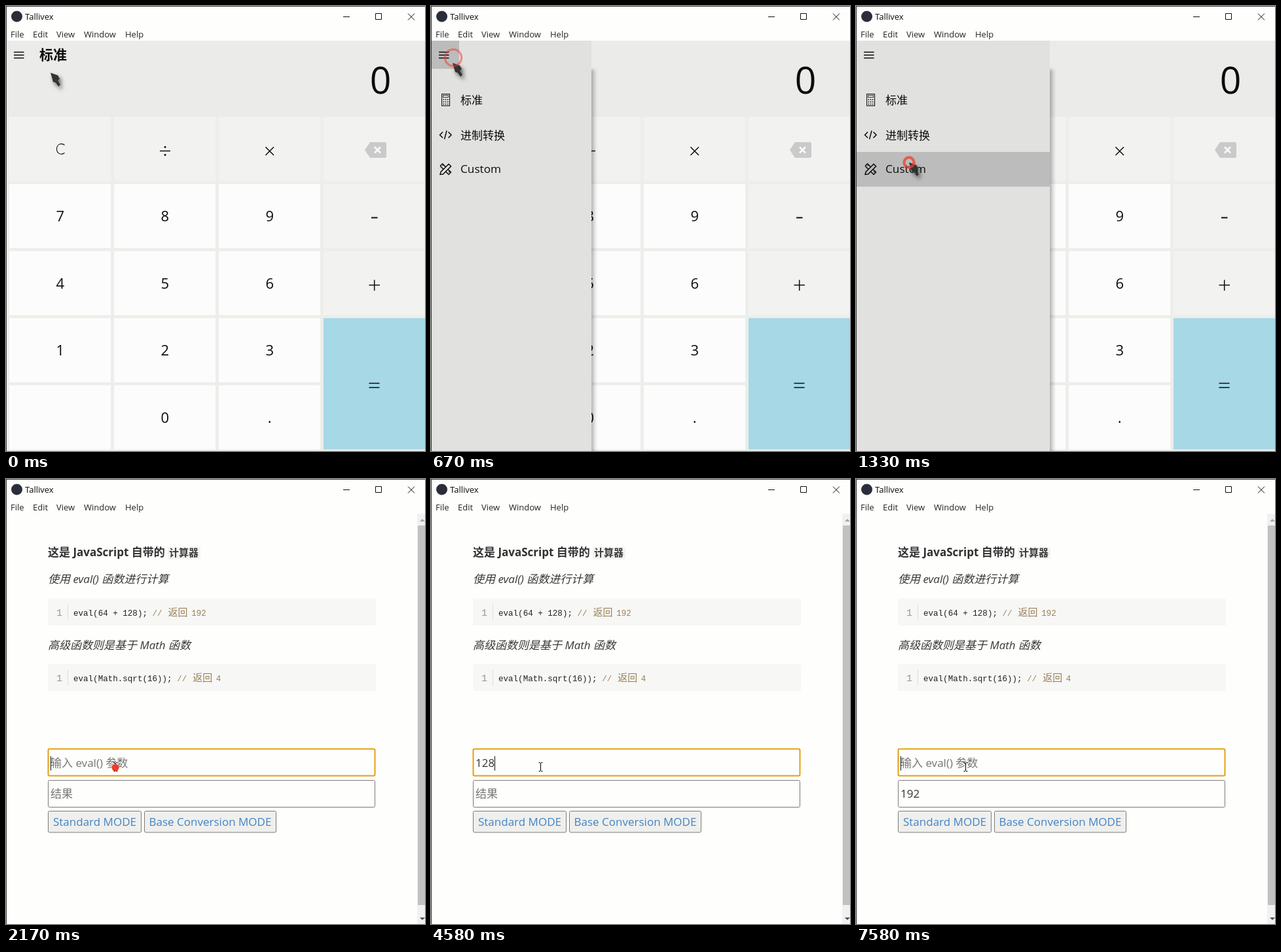
An HTML page that plays this animation: 640x680 px, repeating every 8 s.

```html
<!DOCTYPE html>
<html lang="zh-CN">
<head>
<meta charset="utf-8">
<title>Calculator</title>
<style>
html, body { margin: 0; width: 100%; height: 100%; overflow: hidden; background: #fefefe; }
#stage { display: block; width: 640px; height: 680px; }
text { font-family: "Open Sans", "Noto Sans CJK SC", "Noto Sans CJK", sans-serif; white-space: pre; }
.mono { font-family: "Liberation Mono", "Noto Sans CJK SC", "Noto Sans CJK", monospace; }
.line { fill: none; stroke: #0c0c0c; }
#arrow { filter: drop-shadow(3px 4px 3px rgba(0, 0, 0, .6)); }
#shade { filter: blur(2px); }
</style>
</head>
<body>
<svg id="stage" viewBox="0 0 640 680"></svg>
<script>
const LOOP = 8000, FPS = 12;
const INK = '#0c0c0c', GREY = '#ededea', PALE = '#f2f2f0', PAPER = '#fefefd', HOVER = '#bcbcbc';
const BORDER = '#7a7a7a', HINT = '#757575', BODY = '#333';

const rect = (x, y, w, h, fill, more = '') =>
  `<rect x="${x}" y="${y}" width="${w}" height="${h}" fill="${fill}" ${more}/>`;
const text = (x, y, size, str, more = '') =>
  `<text x="${x}" y="${y}" font-size="${size}" fill="${INK}" ${more}>${str}</text>`;
const line = (d, width = 1.5, more = '') =>
  `<path class="line" d="${d}" stroke-width="${width}" ${more}/>`;
const dot = (x, y, r, fill) => `<circle cx="${x}" cy="${y}" r="${r}" fill="${fill}"/>`;

function titleBar() {
  const menus = [['File', 7], ['Edit', 41], ['View', 77], ['Window', 119], ['Help', 182]];
  return rect(0, 0, 640, 53, PAPER) + dot(16.5, 16, 8.5, '#2b2e3a') +
    text(29, 21, 13, 'Tallivex') +
    menus.map(([name, x]) => text(x, 48, 13, name, 'fill-opacity=".9"')).join('') +
    line('M515 16.5h10M564.5 11.5h9v9h-9zM614 11.5l10 10M624 11.5l-10 10', 1) +
    rect(0, 0, 640, 1, '#3c3c3c') + rect(0, 0, 1, 680, '#3c3c3c');
}

function calculator() {
  const colX = c => 5 + 160 * c, rowY = r => 169.5 + 102.5 * r;
  let out = rect(0, 53, 640, 627, GREY) + rect(1, 53, 639, 116, '#ebebe9');
  for (let r = 0; r < 5; r++)
    for (let c = 0; c < 4; c++) {
      if (c === 3 && r > 2) continue;
      out += rect(colX(c), rowY(r), 155, 98, r && c < 3 ? '#fcfcfc' : PALE);
    }
  out += rect(485, 477, 155, 200.5, '#a6d8e6');
  ['789', '456', '123', ' 0.'].forEach((row, r) => [...row].forEach((key, c) => {
    out += text(colX(c) + 77.7, 329 + 102.6 * r, 22, key, 'text-anchor="middle"');
  }));
  out += line('M89.5 212.5C84 208.5 77.5 211.5 77.5 218.5S84 228.5 89.5 224.5', 1.1);
  out += line('M235 221.5h16') + dot(243, 215.5, 1.5, INK) + dot(243, 227.5, 1.5, INK);
  out += line('M396.5 215.5l12.5 12.5M409 215.5l-12.5 12.5');
  out += line('M558 323.5h9.5', 2) + line('M554.5 426.5h16.5M562.7 418.5v16.5');
  out += line('M554.5 576.5h16M554.5 583h16');
  out += '<path d="M548 220l8-12h23q2 0 2 2v20q0 2-2 2h-23z" fill="#cacaca"/>' +
    '<path d="M563 215.5l9 9M572 215.5l-9 9" stroke="#fafafa" stroke-width="2.5"/>';
  return out + text(51, 82, 21, '标准', 'font-weight="700"') +
    text(572, 133.5, 57, '0', 'text-anchor="middle"');
}

function menuItems() {
  const calc = rect(16.5, 134.5, 12, 18, 'none', `stroke="${INK}"`) +
    rect(18.5, 136.5, 8, 3, 'none', `stroke="${INK}" stroke-width=".8"`) +
    line('M18.5 143h8M18.5 146.5h8M18.5 150h8', 1.6, 'stroke-dasharray="1.6 1.6"');
  const code = line('M18 192.5l-4.5 4.5l4.5 4.5M26.5 192.5l4.5 4.5l-4.5 4.5M24 190.5l-3.5 13');
  const tools = line('M14 257.5l1-4L27 241.5l3.5 3.5L18.5 257zM14 244.5l3.5-3.5l5 5M22 252.5l5 5l3.5-3.5l-5-5M14 244.5l5 5M17.5 244l1.5-1.5M27 254l1.5-1.5');
  return calc + code + tools + text(45, 150, 17, '标准') +
    text(45, 203.5, 17, '进制转换') + text(45, 255, 17.2, 'Custom');
}

function codeBlock(y, code, result) {
  const at = n => 103 + 7.53 * n, n = code.length + 1, note = '#99805a';
  const mono = (x, size, str, fill) =>
    `<text class="mono" x="${x}" y="${y + 26}" font-size="${size}" fill="${fill}">${str}</text>`;
  return rect(64, y, 501, 41.5, '#f7f7f5', 'rx="2"') + rect(94, y + 9, 1, 24, '#dededc') +
    mono(77, 15, '1', '#999') + mono(at(0), 12.55, code, '#222') +
    mono(at(n), 12.55, '//', note) + mono(at(n + 3) + 1.5, 15, '返回', note) +
    mono(at(n + 8) - .5, 12.55, result, note);
}

function button(x, w, label) {
  return rect(x + .5, 507.5, w - 1, 32.5, '#efefed', `rx="2" stroke="${BORDER}"`) +
    text(x + w / 2, 530, 17, label, 'style="fill:#4183c4" text-anchor="middle"');
}

function customPage() {
  const italic = (y, str) => text(64, y, 17, str, 'font-style="italic" fill-opacity=".82"');
  return rect(0, 53, 640, 627, PAPER) +
    rect(628, 53, 12, 627, '#f1f1f1') + rect(629, 71, 11, 580, '#c1c1c1') +
    '<path d="M632 65l4-4l4 4z" fill="#a3a3a3"/><path d="M632 670l4 4l4-4z" fill="#505050"/>' +
    text(64, 118, 17, '这是 JavaScript 自带的', 'font-weight="700" fill-opacity=".85"') +
    rect(247, 104, 50, 18.5, '#f3f3f0', 'rx="2"') +
    text(249, 118, 15, '计算器', 'class="mono" font-weight="700" fill-opacity=".8"') +
    italic(159, '使用 eval() 函数进行计算') + codeBlock(182.5, 'eval(64 + 128);', '192') +
    italic(260, '高级函数则是基于 Math 函数') + codeBlock(282.5, 'eval(Math.sqrt(16));', '4') +
    rect(64.5, 412.5, 499, 41, PAPER, 'id="field" rx="2"') +
    rect(64.5, 460.5, 499, 41, PAPER, `rx="2" stroke="${BORDER}"`) +
    text(68, 440, 17, '', 'id="entry"') + text(68, 487, 17, '', 'id="answer"') +
    rect(0, 423.5, 1, 22, INK, 'id="caret"') +
    button(64, 143, 'Standard MODE') + button(211, 202, 'Base Conversion MODE');
}

const stage = document.getElementById('stage');
stage.innerHTML = `
<defs><linearGradient id="fade"><stop stop-color="#000" stop-opacity=".4"/>
<stop offset="1" stop-color="#000" stop-opacity="0"/></linearGradient></defs>
<g id="calc">${calculator()}
  ${rect(-3, 97, 11, 590, 'url(#fade)', 'id="shade"')}
  <svg id="panel" x="0" y="0" width="0" height="680">${rect(0, 53, 300, 627, '#e1e1e0')}
    ${rect(0, 223, 300, 53, HOVER, 'id="row"')}${menuItems()}</svg>
  ${rect(1, 53, 42, 43, HOVER, 'id="burger"')}${line('M12 70.5h15.5M12 75h15.5M12 79.5h15.5', 1.6)}
</g>
<g id="page">${customPage()}</g>
${titleBar()}
<g id="pointer"><path id="arrow" d="M0 0L11 4L14 9L11 12L15 18L12 21L8 15L4 14Z" fill="#333"/>
<path id="beam" class="line" d="M-3 -6.5h2.5M.5 -6.5h2.5M0 -6v12M-3 6.5h2.5M.5 6.5h2.5" stroke-width="1.1"/></g>
<circle id="ring" fill="none" stroke="#f03a2c"/>`;

const el = {};
stage.querySelectorAll('[id]').forEach(n => el[n.id] = n);
const show = (node, on) => node.style.display = on ? '' : 'none';
const set = (node, attrs) => { for (const k in attrs) node.setAttribute(k, attrs[k]); };
const clamp = p => Math.max(0, Math.min(1, p));

const path = [[0, 68, 102], [420, 34, 79], [500, 34, 79], [670, 33, 87], [1250, 81, 239],
  [1670, 81, 239], [2170, 167.5, 440]];
const clicks = [[500, 34, 79], [1250, 81, 239], [2170, 167, 441]];
const typing = [[0, ''], [2920, '1'], [3170, '12'], [3420, '128'], [5080, '128+'],
  [5250, '128+6'], [5420, '128+64'], [7580, '']];
// the caret turns on and off in turn
const caretFlips = [2170, 2670, 2920, 4000, 4500, 5080, 5080, 5920, 6420, 6920, 7500];
const MENU_AT = 560, MENU_MS = 200, PAGE_AT = 1500, FOCUS_AT = 2170, ANSWER_AT = 5830, RING_MS = 580;

function pointerAt(t) {
  const i = path.findIndex(p => p[0] > t);
  if (i < 0) return path[path.length - 1].slice(1);
  const [t0, x0, y0] = path[i - 1], [t1, x1, y1] = path[i];
  const p = (t - t0) / (t1 - t0), e = p * p * (3 - 2 * p);
  return [x0 + (x1 - x0) * e, y0 + (y1 - y0) * e];
}

function render(t) {
  const [x, y] = pointerAt(t), onPage = t >= PAGE_AT;
  show(el.calc, !onPage);
  show(el.page, onPage);

  const open = 1 - (1 - clamp((t - MENU_AT) / MENU_MS)) ** 2.2;
  set(el.panel, { width: 296 * open });
  set(el.shade, { x: 296 * open - 3 });
  show(el.shade, open > 0);
  show(el.burger, x < 43 && y < 95);
  const row = Math.floor((y - 117) / 53);
  show(el.row, open === 1 && row >= 0 && row < 3);
  set(el.row, { y: 117 + 53 * row });

  const inField = onPage && y > 412;
  set(el.pointer, { transform: `translate(${x} ${y})` });
  show(el.arrow, !inField);
  show(el.beam, inField);

  const click = clicks.find(c => t >= c[0] && t < c[0] + RING_MS);
  show(el.ring, click);
  if (click) {
    const p = (t - click[0]) / RING_MS;
    set(el.ring, { cx: click[1], cy: click[2], r: 3 + 33 * p,
      'stroke-width': Math.max(2.5, 5 - 6 * p), 'stroke-opacity': (1 - p) ** 2 });
  }

  const focus = t >= FOCUS_AT;
  set(el.field, { stroke: focus ? '#e59f10' : BORDER, 'stroke-width': focus ? 2 : 1 });
  const typed = typing.filter(s => s[0] <= t).pop()[1];
  el.entry.textContent = typed || '输入 eval() 参数';
  el.entry.style.fill = typed ? BODY : HINT;
  const solved = t >= ANSWER_AT;
  el.answer.textContent = solved ? '192' : '结果';
  el.answer.style.fill = solved ? BODY : HINT;
  set(el.caret, { x: 68 + Math.round(9.72 * typed.length) });
  show(el.caret, caretFlips.filter(f => f <= t).length % 2);
}

const start = performance.now();
function tick() {
  const t = (performance.now() - start) % LOOP;
  // twelve pictures a second, with times cut to 10 ms
  const step = Math.floor((t + 5) * FPS / 1000);
  render(Math.floor(step * 100 / FPS + .5) * 10 % LOOP);
  requestAnimationFrame(tick);
}
tick();
</script>
</body>
</html>
```
